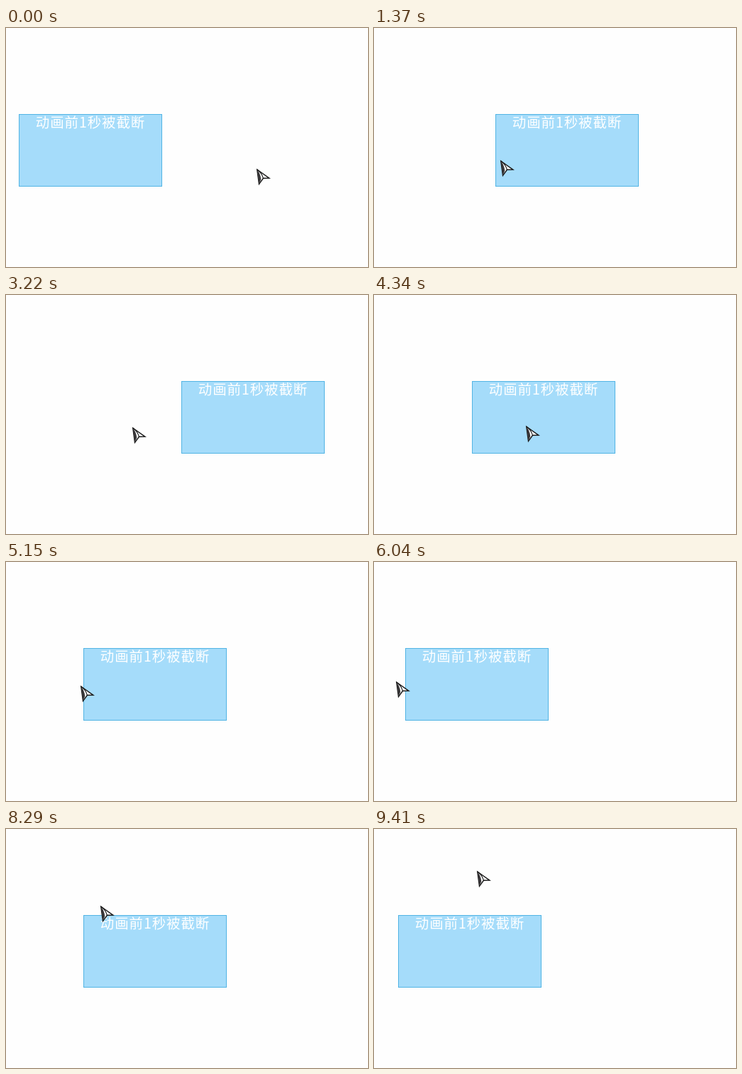
An HTML page that plays this animation: 510x336 px, repeating every 9490 ms.

```html
<!DOCTYPE html>
<html lang="zh-CN">
<head>
<meta charset="utf-8">
<style>
  html, body { margin: 0; width: 100%; height: 100%; overflow: hidden; background: #fefefe; }
  #box, #cursor { position: absolute; left: 0; top: 0; }
  #box {
    top: 121px; width: 202px; height: 102px; box-sizing: border-box;
    border: 1px solid #52b4e4; background: #a5dcfa; color: #fff;
    font: 500 19.5px/20px "Noto Sans CJK SC", "Noto Sans CJK", sans-serif;
    letter-spacing: .9px; text-align: center; white-space: nowrap;
  }
  #cursor { width: 22px; height: 24px; overflow: visible; }
</style>
</head>
<body>
<div id="box">动画前1秒被截断</div>
<svg id="cursor" viewBox="0 0 24 26">
  <path d="M.8 1L19.5 14.3L10.3 14.4L3.8 23.3Z" fill="#fff" stroke="#161616" stroke-width="1.5"/>
  <path d="M.8 1Q6 7 6.8 16L3.8 23.3Z" fill="#383638"/>
  <path d="M.8 1Q8 6 10.3 14.4" fill="none" stroke="#161616" stroke-width="1.2"/>
</svg>
<script>
const LOOP = 9490, HOLD = 400, STEP = 9090 / 113;
const HOME = 18, AWAY = 258, DURATION = 5000, DELAY = -1000;

// Bursts of hover flips: first flip, gap, count
const bursts = [
  [515, 0, 1], [3400, 50, 3], [4273, 0, 1], [4680, 158, 3],
  [6700, 390, 2], [7170, 200, 2], [7480, 135, 6]
];

// Pointer glides: start, end, x, y
const REST = [353, 198];
const glides = [
  [400, 560, 178, 186], [3400, 3800, 200, 275], [4180, 4340, 215, 185],
  [4340, 5700, 31, 168], [6700, 7370, 118, 170], [8060, 8460, 145, 59]
];

const lerp = (a, b, u) => a + (b - a) * u;
const clamp = u => Math.min(1, Math.max(0, u));

// cubic-bezier(.25, .1, .25, 1)
function ease(u) {
  if (u >= 1) return 1;
  let lo = 0, hi = 1;
  for (let i = 0; i < 24; i++) {
    const s = (lo + hi) / 2;
    if (.75 * s * (1 - s) + s ** 3 < u) lo = s; else hi = s;
  }
  const s = lo, r = 1 - s;
  return .3 * s * r * r + 3 * s * s * r + s ** 3;
}

const progress = (m, t) => ease((t - m.start - DELAY * m.scale) / (DURATION * m.scale));

// A flip reverses the transition, shortened by how far it got
function flip(last, start) {
  const p = progress(last, start);
  return {
    start,
    from: lerp(last.from, last.to, p),
    to: last.to === HOME ? AWAY : HOME,
    scale: p * last.scale + 1 - last.scale
  };
}

const moves = [{ start: -DURATION, from: HOME, to: HOME, scale: 1 }];
for (const [first, gap, count] of bursts)
  for (let i = 0; i < count; i++)
    moves.push(flip(moves[moves.length - 1], first + i * gap));

function boxX(t) {
  const m = moves.filter(m => m.start <= t).pop();
  return lerp(m.from, m.to, progress(m, t));
}

const pointerAt = t => glides.reduce(([px, py], [start, end, x, y]) => {
  const u = clamp((t - start) / (end - start));
  return [lerp(px, x, u), lerp(py, y, u)];
}, REST);

const box = document.getElementById("box");
const cursor = document.getElementById("cursor");
const place = (el, x, y) => {
  el.style.transform = `translate(${Math.floor(x)}px, ${Math.floor(y)}px)`;
};

const origin = performance.now();
function draw() {
  const now = (performance.now() - origin) % LOOP;
  const t = now < HOLD ? 0 : HOLD + Math.floor((now - HOLD + 4) / STEP) * STEP;
  place(box, boxX(t), 0);
  place(cursor, ...pointerAt(t));
  requestAnimationFrame(draw);
}
draw();
</script>
</body>
</html>
```
